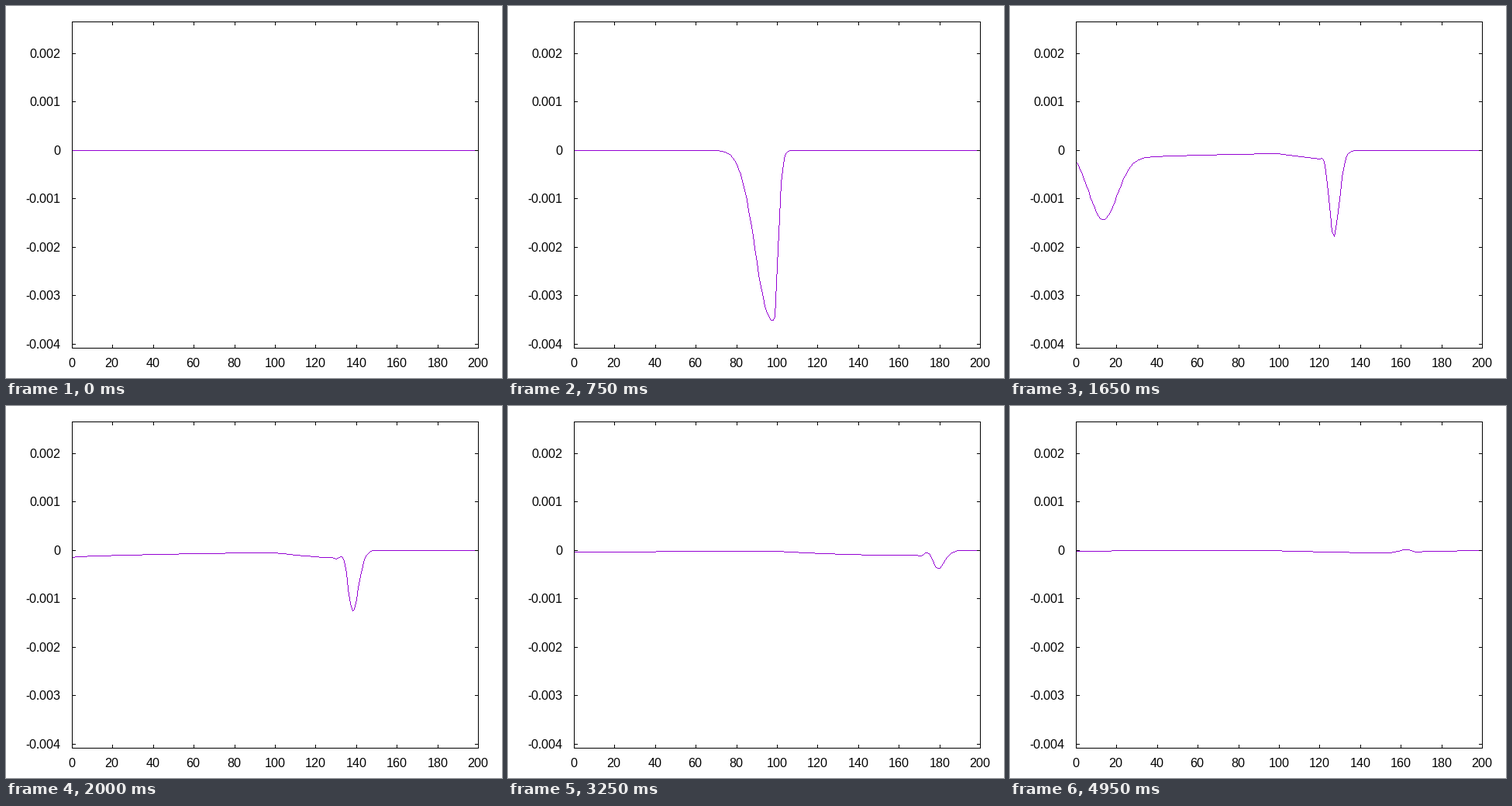
These frames come from a looping animation (640x480 px, 5000 ms). A matplotlib script:

```python
import numpy as np
import matplotlib.pyplot as plt
from matplotlib.animation import FuncAnimation
from matplotlib.collections import PolyCollection

# whole-pixel glyph advances
plt.rcParams["text.hinting"] = "default"
plt.rcParams["text.hinting_factor"] = 1

W, H, DPI = 640, 480, 100
LEFT, RIGHT, TOP, BOTTOM = 85, 609, 20, 441
TICK = 4
FRAMES, STEPS_PER_FRAME = 100, 5

IMP0 = 377.0
SIZE, SOURCE, INTERFACE = 200, 50, 100
EPS_R, LOSS = 9.0, 0.01
Y_MAX, Y_MIN = 1 / IMP0, -0.004083


def pulse(t):
    return np.exp(-(t - 30) ** 2 / 100)


def simulate():
    """1D FDTD: a pulse hits a lossy dielectric; returns snapshots of Hy."""
    ez, hy = np.zeros(SIZE), np.zeros(SIZE)
    lossy = np.arange(SIZE) >= INTERFACE
    ceze = np.where(lossy, (1 - LOSS) / (1 + LOSS), 1.0)
    cezh = np.where(lossy, IMP0 / EPS_R / (1 + LOSS), IMP0)
    shots = []
    for t in range(FRAMES * STEPS_PER_FRAME):
        hy[:-1] += (ez[1:] - ez[:-1]) / IMP0
        hy[SOURCE - 1] -= pulse(t) / IMP0
        ez[0] = ez[1]  # absorbing left end
        ez[1:] = ceze[1:] * ez[1:] + cezh[1:] * (hy[1:] - hy[:-1])
        ez[SOURCE] += pulse(t + 1)
        if t % STEPS_PER_FRAME == 0:
            shots.append(hy[:-1].copy())
    return shots


def nearest(v):
    return np.floor(np.asarray(v) + 0.5).astype(int)


def px(x):
    return nearest(LEFT + (RIGHT - LEFT) * np.asarray(x) / 200)


def py(y):
    return nearest(TOP + (BOTTOM - TOP) * (Y_MAX - np.asarray(y)) / (Y_MAX - Y_MIN))


def box(x0, y0, x1, y1):
    """Rectangle covering whole pixels, both ends included."""
    return [(x0, y0), (x1 + 1, y0), (x1 + 1, y1 + 1), (x0, y1 + 1)]


def walk(a, b, n):
    """n + 1 integer steps from a to b, halves rounded towards b."""
    i = np.arange(n + 1)
    return a + np.sign(b - a) * ((2 * abs(b - a) * i + n) // (2 * n))


def trace(xs, ys):
    """Pixels of a thin Bresenham polyline."""
    cells = {}
    points = list(zip(xs.tolist(), ys.tolist()))
    for p, q in zip(points[:-1], points[1:]):
        dx, dy = q[0] - p[0], q[1] - p[1]
        if -dy > dx:  # steep lines run downwards
            p, q = q, p
        n = max(dx, abs(dy))
        cols, rows = walk(p[0], q[0], n), walk(p[1], q[1], n)
        cells.update(dict.fromkeys(zip(cols.tolist(), rows.tolist())))
    return [box(x, y, x, y) for x, y in cells]


def add_boxes(verts, color, z):
    boxes = PolyCollection(verts, facecolors=color, edgecolors="none",
                           linewidths=0, antialiaseds=False, zorder=z)
    ax.add_collection(boxes, autolim=False)
    return boxes


def label(x, y, text, align):
    """Text whose advance box starts on a pixel; align 0.5 centres, 1 ends at x."""
    width = sum({"-": 5, ".": 4}.get(c, 9) for c in text)
    start = x - int(width * align)
    ax.text(start - 0.45, y, text, ha="left", va="baseline", color="black",
            family="Liberation Sans", size=16 * 72 / DPI)


fig = plt.figure(figsize=(W / DPI, H / DPI), dpi=DPI, facecolor="white")
ax = fig.add_axes([0, 0, 1, 1])
ax.set_xlim(0, W)
ax.set_ylim(H, 0)
ax.axis("off")

ticks = []
for value in range(0, 201, 20):
    x = int(px(value))
    ticks += [box(x, TOP, x, TOP + TICK), box(x, BOTTOM - TICK, x, BOTTOM)]
    label(x, 466, str(value), 0.5)
for milli in range(-4, 3):
    y = int(py(milli / 1000))
    ticks += [box(LEFT, y, LEFT + TICK, y), box(RIGHT - TICK, y, RIGHT, y)]
    label(71, y + 6, f"{milli / 1000:g}", 1)
add_boxes(ticks, "black", 1)

border = [box(LEFT, TOP, RIGHT, TOP), box(LEFT, BOTTOM, RIGHT, BOTTOM),
          box(LEFT, TOP, LEFT, BOTTOM), box(RIGHT, TOP, RIGHT, BOTTOM)]
add_boxes(border, "black", 3)

fields = simulate()
columns = px(np.arange(SIZE - 1))
curve = add_boxes(trace(columns, py(fields[0])), "#9400d3", 2)


def update(i):
    curve.set_verts(trace(columns, py(fields[i])))
    return (curve,)


anim = FuncAnimation(fig, update, frames=FRAMES, interval=50,
                     repeat=True, repeat_delay=0, blit=False)
plt.show()
```
